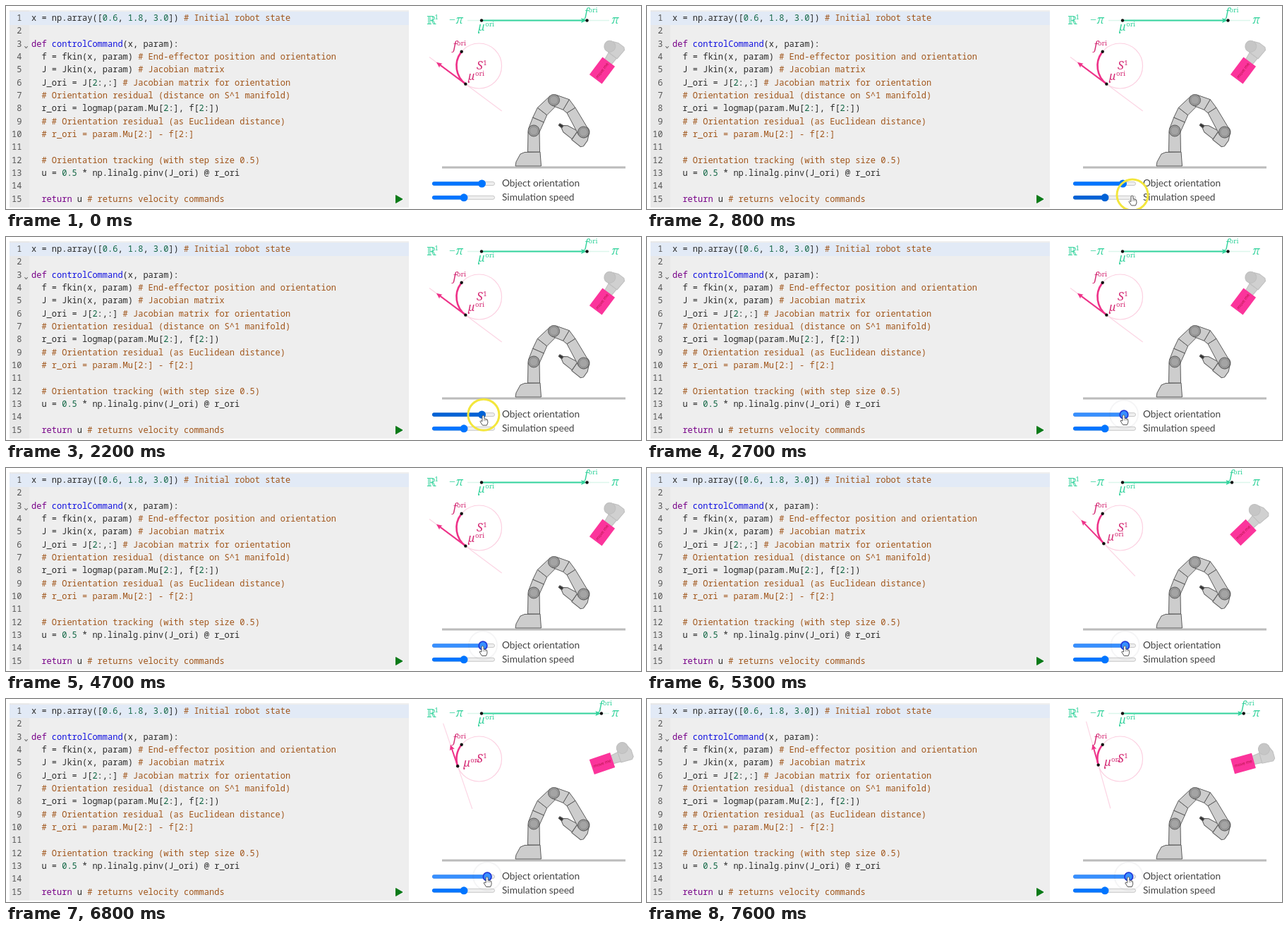
Animation of 900x288 px, one loop 8 s. Source, as an HTML page with a canvas:

```html
<!DOCTYPE html>
<html lang="en">
<head>
<meta charset="utf-8">
<title>Orientation tracking</title>
<style>
html, body { margin: 0; width: 100%; height: 100%; overflow: hidden; background: #fff; }
canvas { display: block; }
</style>
</head>
<body>
<canvas id="stage" width="900" height="288"></canvas>
<script>
const ctx = document.getElementById('stage').getContext('2d');
const LOOP = 8000, STEP = 100;
const GREEN = '#35d39d', PINK = '#ee3289', DARK_PINK = '#d42a74';
const BLUE = '#0075ff', HOVER = '#0062d6', ACTIVE = '#378fff';
const METAL = { fill: '#cdcdcd', joint: '#9b9b9b', edge: '#5c5c5c', tip: '#333' };
const GHOST = { fill: '#d0d0d0', joint: '#c6c6c6', edge: '#bebebe', tip: '#aaa' };
const RAD = Math.PI / 180;

// Object angle: eased from START to START - TURN, in equal slider notches.
const START = 53.3, TURN = 37.7, NOTCHES = 12;
const PRESS = 2500, DRAG = 2700, TURN_FROM = 4900, TURN_TIME = 2700;

// Pointer path before dragging: time, x, y.
const PATH = [
  [600, 706, 274], [800, 688, 268], [1000, 682, 260],
  [1700, 680.5, 255], [2400, 675.5, 251]
];

const CODE = `x = np.array([0.6, 1.8, 3.0]) # Initial robot state

def controlCommand(x, param):
  f = fkin(x, param) # End-effector position and orientation
  J = Jkin(x, param) # Jacobian matrix
  J_ori = J[2:,:] # Jacobian matrix for orientation
  # Orientation residual (distance on S^1 manifold)
  r_ori = logmap(param.Mu[2:], f[2:])
  # # Orientation residual (as Euclidean distance)
  # r_ori = param.Mu[2:] - f[2:]

  # Orientation tracking (with step size 0.5)
  u = 0.5 * np.linalg.pinv(J_ori) @ r_ori

  return u # returns velocity commands`.split('\n');

const clamp = v => Math.min(1, Math.max(0, v));
const mix = (a, b, k) => a + (b - a) * k;

function angleAt(t) {
  const p = clamp((t - TURN_FROM) / TURN_TIME);
  const eased = 1 - (1 - p) ** 2;
  return START - TURN * Math.round(eased * NOTCHES) / NOTCHES;
}

function pointerAt(t, thumb) {
  if (t < PATH[0][0]) return null;
  if (t >= DRAG) return [thumb, 251.5];
  const i = PATH.findIndex(k => k[0] > t);
  if (i < 0) return PATH.at(-1).slice(1);
  const a = PATH[i - 1], b = PATH[i], k = (t - a[0]) / (b[0] - a[0]);
  return [mix(a[1], b[1], k), mix(a[2], b[2], k)];
}

function paint(fill, stroke, width = 1) {
  if (fill) { ctx.fillStyle = fill; ctx.fill(); }
  if (stroke) { ctx.strokeStyle = stroke; ctx.lineWidth = width; ctx.stroke(); }
}

function line(x1, y1, x2, y2, color, width) {
  ctx.beginPath();
  ctx.moveTo(x1, y1);
  ctx.lineTo(x2, y2);
  paint(null, color, width);
}

function disc(x, y, r, fill, stroke, width) {
  ctx.beginPath();
  ctx.arc(x, y, r, 0, 2 * Math.PI);
  paint(fill, stroke, width);
}

function poly(points, fill, stroke) {
  ctx.beginPath();
  for (let i = 0; i < points.length; i += 2) ctx.lineTo(points[i], points[i + 1]);
  ctx.closePath();
  paint(fill, stroke);
}

function text(str, x, y, font, color, align = 'left') {
  ctx.font = font;
  ctx.fillStyle = color;
  ctx.textAlign = align;
  ctx.fillText(str, x, y);
}

function placed(x, y, angle, drawLocal) {
  ctx.save();
  ctx.translate(x, y);
  ctx.rotate(angle);
  drawLocal();
  ctx.restore();
}

function arrow(x1, y1, x2, y2, color) {
  const a = Math.atan2(y2 - y1, x2 - x1);
  line(x1, y1, x2 - 4 * Math.cos(a), y2 - 4 * Math.sin(a), color, 2);
  placed(x2, y2, a, () => poly([0, 0, -8, -3.6, -6.5, 0, -8, 3.6], color));
}

function symbol(base, sup, x, y, color) {
  text(base, x, y, 'italic 16px "Noto Serif", serif', color);
  const w = ctx.measureText(base).width;
  text(sup, x + w + 0.5, y - 6, '9.5px "Noto Serif", serif', color);
}

function drawCode() {
  const mono = '12px "Noto Sans Mono", monospace';
  const token = /#.*|\b(?:def|return)\b|controlCommand|\b\d+(?:\.\d+)?|[^#]/g;
  ctx.fillStyle = '#eee';
  ctx.fillRect(5, 6, 566, 280);
  ctx.fillStyle = '#e8e8e8';
  ctx.fillRect(5, 6, 28, 280);
  ctx.fillStyle = '#e2eaf6';
  ctx.fillRect(5, 8, 566, 19);
  CODE.forEach((src, i) => {
    const y = Math.round(21 + i * 18.33);
    text(i + 1, 22.5, y, mono, '#555', 'right');
    for (const m of src.matchAll(token)) {
      const s = m[0];
      let color = '#2a2a2a';
      if (s[0] === '#') color = '#a0551a';
      else if (s === 'def' || s === 'return') color = '#770088';
      else if (s === 'controlCommand') color = '#1010e0';
      else if (/^\d/.test(s)) color = '#116644';
      text(s, 36 + m.index * 7.2, y, mono, color);
    }
  });
  line(26.5, 57, 28.5, 60, '#555', 1);
  line(28.5, 60, 30.5, 57, '#555', 1);
  poly([552.5, 268.5, 562, 274, 552.5, 279.5], '#0a7a18', '#0a7a18');
}

function drawAxis(phi) {
  const y = 20.5, start = 674, end = 823 + 0.59 * (START - phi);
  symbol('', '1', 607, 25, GREEN);
  text('ℝ', 596, 26, '16px "DejaVu Serif", serif', GREEN);
  symbol('−π', '', 627, 25, GREEN);
  symbol('π', '', 858.5, 25, GREEN);
  line(654, y, 855, y, '#dcf6ec', 1.5);
  arrow(start, y, end, y, GREEN);
  disc(start, y, 2.2, '#111');
  disc(end + 0.5, y, 2.2, '#111');
  symbol('μ', 'ori', 669, 34.5, GREEN);
  symbol('f', 'ori', end - 3, 15, GREEN);
}

function drawCircle(phi) {
  const cx = 670.5, cy = 85, r = 32;
  const from = (180 - phi) * RAD, to = 219.2 * RAD;
  const nx = Math.cos(from), ny = Math.sin(from);
  const mx = cx + r * nx, my = cy + r * ny;
  const len = r * (to - from);

  disc(cx, cy, r, null, '#fccfe0', 1.2);
  line(mx + 64 * ny, my - 64 * nx, mx - 64 * ny, my + 64 * nx, '#fcd5e4', 1.2);
  ctx.beginPath();
  ctx.arc(cx, cy, r, from, to);
  paint(null, PINK, 2.6);
  arrow(mx, my, mx - len * ny, my + len * nx, PINK);
  disc(mx, my, 2.2, '#111');
  disc(cx + r * Math.cos(to), cy + r * Math.sin(to), 2.2, '#111');

  symbol('f', 'ori', 633.5, 61.5, DARK_PINK);
  symbol('μ', 'ori', mx - 13 * nx - 4.3, my - 13 * ny + 4.5, DARK_PINK);
  symbol('S', '1', 667, 90, DARK_PINK);
}

// Chain of tapered links; each node is x, y, half width.
function limb(nodes) {
  const sides = nodes.map(([x, y, h], i) => {
    const a = nodes[Math.max(0, i - 1)], b = nodes[Math.min(nodes.length - 1, i + 1)];
    const d = Math.atan2(b[1] - a[1], b[0] - a[0]);
    const dx = -h * Math.sin(d), dy = h * Math.cos(d);
    return [x + dx, y + dy, x - dx, y - dy];
  });
  for (let i = 1; i < sides.length; i++) {
    const [ax, ay, bx, by] = sides[i];
    poly([...sides[i - 1], bx, by, ax, ay], METAL.fill, METAL.edge);
  }
}

// Hand in its own frame: finger tip at the origin, wrist joint up and right.
function drawHand(x, y, angle, { fill, joint, edge, tip }) {
  placed(x, y, angle, () => {
    poly([-1, -2, 9, -3, 9, 2, -1, 1], tip, edge);
    poly([5, -3, 10, -6, 26, -8, 26, 6, 10, 5, 5, 2], fill, edge);
    poly([26, -9, 30, -14, 42, -12, 45, -5, 45, 5, 42, 8, 26, 7], fill, edge);
    disc(33.9, -11.8, 8, joint, edge);
  });
}

function drawObject(phi) {
  const x = 845, y = 91.5, a = -phi * RAD;
  drawHand(x, y, a, GHOST);
  placed(x, y, a, () => {
    ctx.fillStyle = '#fb349b';
    ctx.fillRect(-15.5, -11, 31, 22);
    text('move me', 0, 2, '6px "Open Sans", sans-serif', '#b01040', 'center');
  });
}

function drawJoint(x, y) {
  disc(x, y, 8, METAL.joint, METAL.edge);
  disc(x, y, 5.8, '#a4a4a4', '#8a8a8a', 0.8);
}

function drawRobot() {
  line(618, 229, 878, 229, '#bbb', 3);
  poly([722, 227, 723, 221, 729, 210, 735, 207.5, 757, 207, 758.5, 227], METAL.fill, METAL.edge);
  limb([[748, 207, 8.5], [748, 178, 8]]);
  limb([[748, 177, 8], [754.5, 161.5, 8.5], [760, 149.5, 8.5], [776.5, 133.5, 8]]);
  drawHand(784.5, 169, 35 * RAD, METAL);
  limb([[776.5, 133.5, 8], [794, 140, 8.5], [801, 148, 7], [818.5, 179, 8]]);
  drawJoint(748, 177);
  drawJoint(776.5, 133.5);
  drawJoint(818.5, 179);
}

function drawSlider(y, thumb, color, label) {
  ctx.beginPath();
  ctx.roundRect(604.5, y - 2.5, 88, 5, 2.5);
  paint('#efefef', '#c8c8c8');
  ctx.beginPath();
  ctx.roundRect(604, y - 2.7, thumb - 604, 5.4, 2.7);
  paint(color);
  disc(thumb, y, 5.5, color);
  text(label, 703, y + 4, '13.7px Lato, sans-serif', '#444');
}

function drawPointer(x, y) {
  placed(x, y, 0, () => {
    ctx.lineJoin = 'round';
    ctx.beginPath();
    ctx.moveTo(-1.5, 8);
    ctx.lineTo(-1.5, 1);
    ctx.quadraticCurveTo(0, -1, 1.5, 1);
    ctx.lineTo(1.5, 4.5);
    ctx.lineTo(6, 6);
    ctx.quadraticCurveTo(7.5, 10, 5, 14);
    ctx.lineTo(-1, 14);
    ctx.lineTo(-4.5, 8.5);
    ctx.quadraticCurveTo(-4, 6.5, -1.5, 8.5);
    ctx.closePath();
    paint('#fff', '#555', 1);
    line(1.5, 5, 1.5, 8, '#777', 0.8);
    line(3.8, 5.8, 3.8, 8, '#777', 0.8);
  });
}

function draw(time) {
  const t = Math.floor(time / STEP) * STEP;
  const phi = angleAt(t);
  const drag = t >= DRAG;
  const thumb = drag ? 676 + (START - phi) / 5.6 : 674.5;
  const pointer = pointerAt(t, thumb);
  let first = BLUE, second = BLUE;
  if (drag) first = ACTIVE;
  else if (pointer && pointer[1] < 255) first = HOVER;
  else if (pointer && pointer[0] < 693 && pointer[1] > 264) second = HOVER;

  ctx.fillStyle = '#fff';
  ctx.fillRect(0, 0, 900, 288);
  drawCode();
  drawAxis(phi);
  drawCircle(phi);
  drawObject(phi);
  drawRobot();
  drawSlider(252, thumb, first, 'Object orientation');
  drawSlider(271.8, 649, second, 'Simulation speed');

  if (!pointer) return;
  const [x, y] = pointer;
  if (t < PRESS) {
    disc(x, y, 22, null, '#f3e63c', 3);
  } else {
    disc(x, y + 0.5, 5.8, null, '#2038d8', 1.8);
    disc(x, y, 20, null, 'rgba(90,90,110,0.06)', 2);
  }
  drawPointer(x - 0.5, y + 1);
}

function tick(now) {
  draw(now % LOOP);
  requestAnimationFrame(tick);
}
draw(0);
requestAnimationFrame(tick);
</script>
</body>
</html>
```
